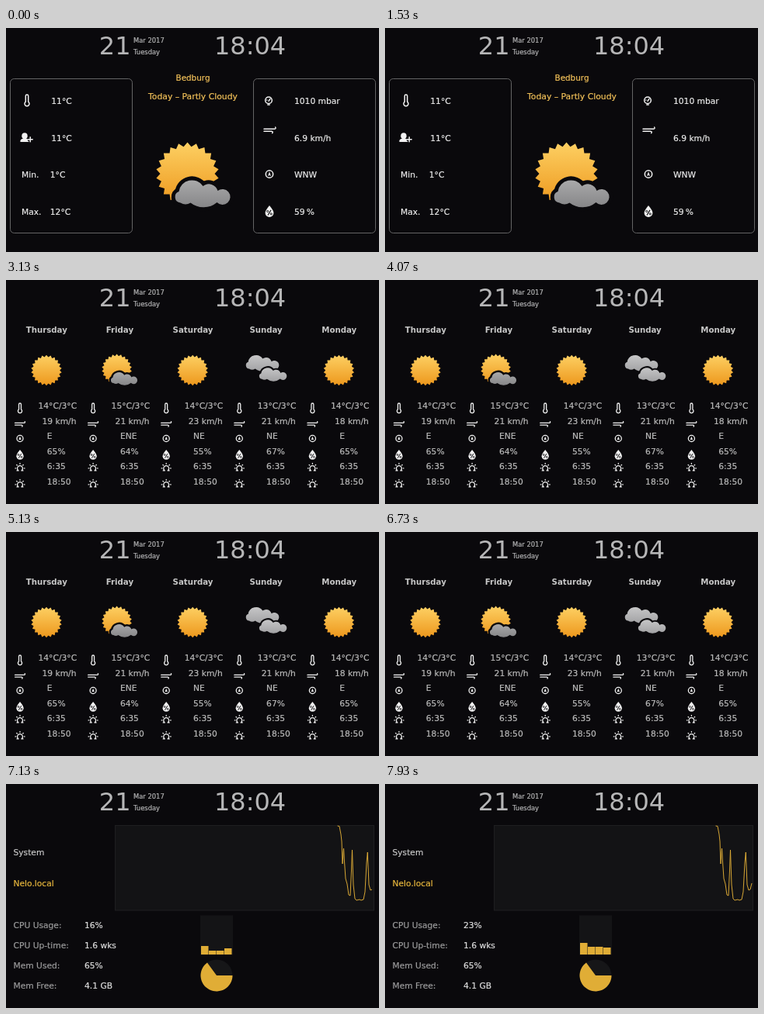
Recreate the animation shown at these times as an HTML page. Size 480 px wide and 289 px high, loop 8000 ms.

```html
<!DOCTYPE html>
<html lang="en">
<head>
<meta charset="utf-8">
<title>Weather dashboard</title>
<style>
html, body { margin: 0; width: 100%; height: 100%; overflow: hidden; background: #0a090c; }
svg { display: block; width: 480px; height: 289px; }
text { font-family: "DejaVu Sans", sans-serif; font-size: 10.7px; white-space: pre; stroke-width: .2; }
.line { fill: none; stroke: #f2f2f2; stroke-width: 1.5; stroke-linecap: round; stroke-linejoin: round; }
.solid { fill: #f2f2f2; }
.dark { fill: none; stroke: #0a090c; }
</style>
</head>
<body>
<svg id="stage" viewBox="0 0 480 289">
  <defs>
    <linearGradient id="gold" x1="0" y1="0" x2="0" y2="1">
      <stop offset="0" stop-color="#fdd063"/><stop offset="1" stop-color="#ed971c"/>
    </linearGradient>
    <linearGradient id="grey" x1="0" y1="0" x2="0" y2="1">
      <stop offset="0" stop-color="#a9a9aa"/><stop offset="1" stop-color="#868688"/>
    </linearGradient>
    <linearGradient id="pale" x1="0" y1="0" x2="0" y2="1">
      <stop offset="0" stop-color="#c6c6c7"/><stop offset="1" stop-color="#a2a2a4"/>
    </linearGradient>
  </defs>
</svg>
<script>
const BG = '#0a090c', GOLD = '#e0ad36', AMBER = '#f6c45a';
const LOOP = 8000, FADE = 320, TO_FORECAST = 2750, TO_SYSTEM = 6750, REFRESH = 7400;
const stage = document.getElementById('stage');

function add(parent, tag, attrs) {
  const el = document.createElementNS('http://www.w3.org/2000/svg', tag);
  for (const key in attrs) el.setAttribute(key, attrs[key]);
  return parent.appendChild(el);
}
function group(parent, x = 0, y = 0, scale = 1) {
  return add(parent, 'g', { transform: `translate(${x} ${y}) scale(${scale})` });
}
function label(parent, x, y, content, fill, style = '') {
  const el = add(parent, 'text', { x, y, fill, stroke: fill, style });
  el.textContent = content;
  return el;
}
function path(parent, d, attrs) {
  return add(parent, 'path', { d, ...attrs });
}

// Line icons, centred on their own origin
const LINE = { class: 'line' }, SOLID = { class: 'solid' };
const icons = {
  thermo(g) {
    path(g, 'M-1.7 -5.3a1.7 1.7 0 0 1 3.4 0V2.2a3 3 0 1 1 -3.4 0Z', LINE);
  },
  user(g) {
    add(g, 'ellipse', { cx: -2, cy: -2.2, rx: 3.7, ry: 4, class: 'solid' });
    path(g, 'M-7.5 5.5Q-8.4 2 -4 1.2H0Q4 1.8 4 5.5Z', SOLID);
    path(g, 'M5.2 -1V5.6M1.9 2.3H8.5', { class: 'dark', 'stroke-width': 4 });
    path(g, 'M5.2 -.7V5.3M2.2 2.3H8.2', { class: 'line', 'stroke-width': 2 });
  },
  gauge(g) {
    add(g, 'circle', { cy: -.8, r: 4.3, class: 'line' });
    path(g, 'M0 .2L2 -2.6M-2.3 -1H-2.2M-1.2 5H1.2', LINE);
  },
  wind(g) {
    path(g, 'M-7.5 -1.8H6.2Q8.2 -2.2 7.2 -4M-7.5 1.2H2.4Q4.4 1.6 3.2 3.6', LINE);
  },
  compass(g) {
    add(g, 'circle', { r: 4.7, class: 'line' });
    path(g, 'M0 -3.2L2 2.4L0 1.5L-2 2.4Z', SOLID);
  },
  drop(g) {
    path(g, 'M0 -7.5Q5.4 -1 5.4 2A5.4 5.4 0 0 1 -5.4 2Q-5.4 -1 0 -7.5Z', SOLID);
    path(g, 'M2 -1.6L-2 5', { class: 'dark', 'stroke-width': 1.1 });
    for (const s of [-1, 1])
      add(g, 'circle', { cx: 2.3 * s, cy: 1.7 + 1.7 * s, r: 1.1, class: 'dark', 'stroke-width': .9 });
  },
  horizon(g) {
    path(g, 'M-4.6 5.2H-2.2A4 4 0 1 1 2.2 5.2H4.6', LINE);
    path(g, 'M0 -5.8V-4.8M-5 -3.6L-4.3 -2.9M5 -3.6L4.3 -2.9M-7 1.6H-6.2M7 1.6H6.2', LINE);
  }
};
function icon(parent, name, x, y, scale = 1) {
  icons[name](group(parent, x, y, scale));
}

// Weather pictures
const CLOUD = 'M-9 37.5A7.5 7.5 0 0 1 -11 23A17 17 0 0 1 20 16A12 12 0 0 1 39 22' +
  'A10 10 0 1 1 38 37A27 27 0 0 1 4 37.5A12 12 0 0 1 -9 37.5Z';
function sun(parent, x, y, scale) {
  const g = group(parent, x, y, scale), points = [];
  for (let i = 0; i < 44; i++) {
    const r = i % 2 ? 35 : 40.5, a = i * Math.PI / 22 - Math.PI / 2;
    points.push((r * Math.cos(a)).toFixed(2) + ',' + (r * Math.sin(a)).toFixed(2));
  }
  add(g, 'polygon', { points: points.join(' '), fill: 'url(#gold)' });
  return g;
}
function cloud(parent, x, y, scale, fill, gap) {
  path(group(parent, x, y, scale), CLOUD, { fill, stroke: BG, 'stroke-width': 2 * gap, 'paint-order': 'stroke' });
}
function partly(parent, x, y, scale) {
  cloud(sun(parent, x, y, scale), 0, 0, 1, 'url(#grey)', 5);
}
function cloudy(parent, x, y) {
  cloud(parent, x, y, .6, 'url(#pale)', 0);
  cloud(parent, x + 15.5, y + 17, .5, 'url(#pale)', 4);
}

// Header
const HEAD = '#b6b6b7', BIG = 'font-size:32px;stroke:none', SMALL = 'font-size:8.4px';
label(stage, 119.8, 34, '21', HEAD, BIG);
label(stage, 164, 18.5, 'Mar 2017', HEAD, SMALL);
label(stage, 164, 34, 'Tuesday', HEAD, SMALL);
label(stage, 268, 34, '18:04', HEAD, BIG);

// Current weather
const today = group(stage);
const WHITE = '#ececec';
for (const x of [5.5, 318.5])
  add(today, 'rect', { x, y: 65.5, width: 157, height: 199, rx: 5, fill: 'none', stroke: '#646465' });
label(today, 240.5, 67.5, 'Bedburg', AMBER, 'font-size:10.4px;text-anchor:middle');
label(today, 240.5, 92, 'Today – Partly Cloudy', AMBER, 'font-size:10.8px;text-anchor:middle');
const rows = [98, 146, 193, 241];
['11°C', '11°C', '1°C', '12°C'].forEach((t, i) => label(today, i < 2 ? 58.3 : 56.8, rows[i], t, WHITE));
['1010 mbar', '6.9 km/h', 'WNW', '59\u2009%'].forEach((t, i) => label(today, 371, rows[i], t, WHITE));
label(today, 20, rows[2], 'Min.', WHITE);
label(today, 20, rows[3], 'Max.', WHITE);
icon(today, 'thermo', 27, 93);
icon(today, 'user', 26, 141.5);
icon(today, 'gauge', 338, 94);
icon(today, 'wind', 339.5, 132);
icon(today, 'compass', 339, 188.5);
icon(today, 'drop', 339, 236.5);
partly(today, 233.5, 188, 1);

// System monitor, underneath the forecast
const system = group(stage);
label(system, 9.5, 92, 'System', '#c8c8c8');
label(system, 9.5, 132, 'Nelo.local', '#e9b83d');
const stats = [['CPU Usage:', ''], ['CPU Up-time:', '1.6 wks'], ['Mem Used:', '65%'], ['Mem Free:', '4.1 GB']];
const statValues = stats.map(([name, value], i) => {
  label(system, 9.5, 186 + 26 * i, name, '#9c9c9d');
  return label(system, 101, 186 + 26 * i, value, '#dedede');
});
add(system, 'rect', { x: 140.5, y: 53.5, width: 333, height: 109.5, fill: '#131315', stroke: '#1e1e20' });
add(system, 'rect', { x: 250, y: 169.5, width: 42, height: 51, fill: '#141416' });
const trace = path(system, '', { fill: 'none', stroke: GOLD, 'stroke-width': .95, 'stroke-linejoin': 'round' });
const bars = [0, 1, 2, 3].map(i => add(system, 'rect', { x: 251 + 10 * i, width: 9.5, fill: GOLD }));
add(system, 'circle', { cx: 271, cy: 247, r: 20.5, fill: '#161618' });
const end = 2 * Math.PI * .65;
path(system, `M271 247H291.5A20.5 20.5 0 1 1 ${271 + 20.5 * Math.cos(end)} ${247 + 20.5 * Math.sin(end)}Z`, { fill: GOLD });

const load = [[425.5, 54], [428, 54.5], [430, 65], [431, 74], [432, 103], [433.5, 83], [434.5, 100], [436, 122],
  [438, 129], [440, 143], [442, 144], [443.5, 112], [444.5, 85], [446, 130], [448, 148], [450, 150], [454, 149],
  [456, 150], [459, 149], [461, 139], [463, 102], [464.3, 88], [466, 130], [468, 137], [470, 136], [472, 128]];

// Five day forecast
const forecast = group(stage);
const days = [
  ['Thursday', '14°C/3°C', '19 km/h', 'E', '65%'],
  ['Friday', '15°C/3°C', '21 km/h', 'ENE', '64%'],
  ['Saturday', '14°C/3°C', '23 km/h', 'NE', '55%'],
  ['Sunday', '13°C/3°C', '21 km/h', 'NE', '67%'],
  ['Monday', '14°C/3°C', '18 km/h', 'E', '65%']
];
const dayIcons = [['thermo', 165], ['wind', 186], ['compass', 204.5], ['drop', 225.5], ['horizon', 241.5], ['horizon', 262.5]];
days.forEach(([name, ...values], i) => {
  const g = group(forecast, 94.1 * i);
  label(g, 52.3, 68, name, '#c8c8c8', 'font-size:10.2px;font-weight:bold;text-anchor:middle;stroke:none');
  if (name === 'Friday') partly(g, 48.5, 115, .48);
  else if (name === 'Sunday') cloudy(g, 36, 92);
  else sun(g, 52, 116.5, .49);
  dayIcons.forEach(([kind, y]) => icon(g, kind, 18, y, .86));
  [...values, '6:35', '18:50'].forEach((t, row) =>
    label(g, [41.5, 46.5][row] || 52.8, 166 + 19.55 * row, t, '#bababa'));
});

function showSample(fresh) {
  const shift = fresh ? 0 : 1;
  const points = fresh ? load : load.slice(0, -1);
  trace.setAttribute('d', 'M' + points.map(([x, y]) => `${x + shift} ${y}`).join('L'));
  statValues[0].textContent = fresh ? '23%' : '16%';
  (fresh ? [15, 10, 10, 9] : [11, 5, 5, 8]).forEach((h, i) => {
    bars[i].setAttribute('y', 220 - h);
    bars[i].setAttribute('height', h);
  });
}

const ramp = (t, start) => Math.min(1, Math.max(0, (t - start) / FADE));
const easeOut = p => p * (2 - p);
function show(el, opacity) {
  el.setAttribute('opacity', opacity);
  el.setAttribute('visibility', opacity > 0 ? 'visible' : 'hidden');
}
function draw(now) {
  const t = now % LOOP;
  const first = ramp(t, TO_FORECAST), second = ramp(t, TO_SYSTEM);
  show(today, 1 - first);
  show(forecast, easeOut(first) * (1 - second));
  show(system, easeOut(second));
  showSample(t >= REFRESH);
}
function tick() {
  draw(performance.now());
  requestAnimationFrame(tick);
}
tick();
</script>
</body>
</html>
```
